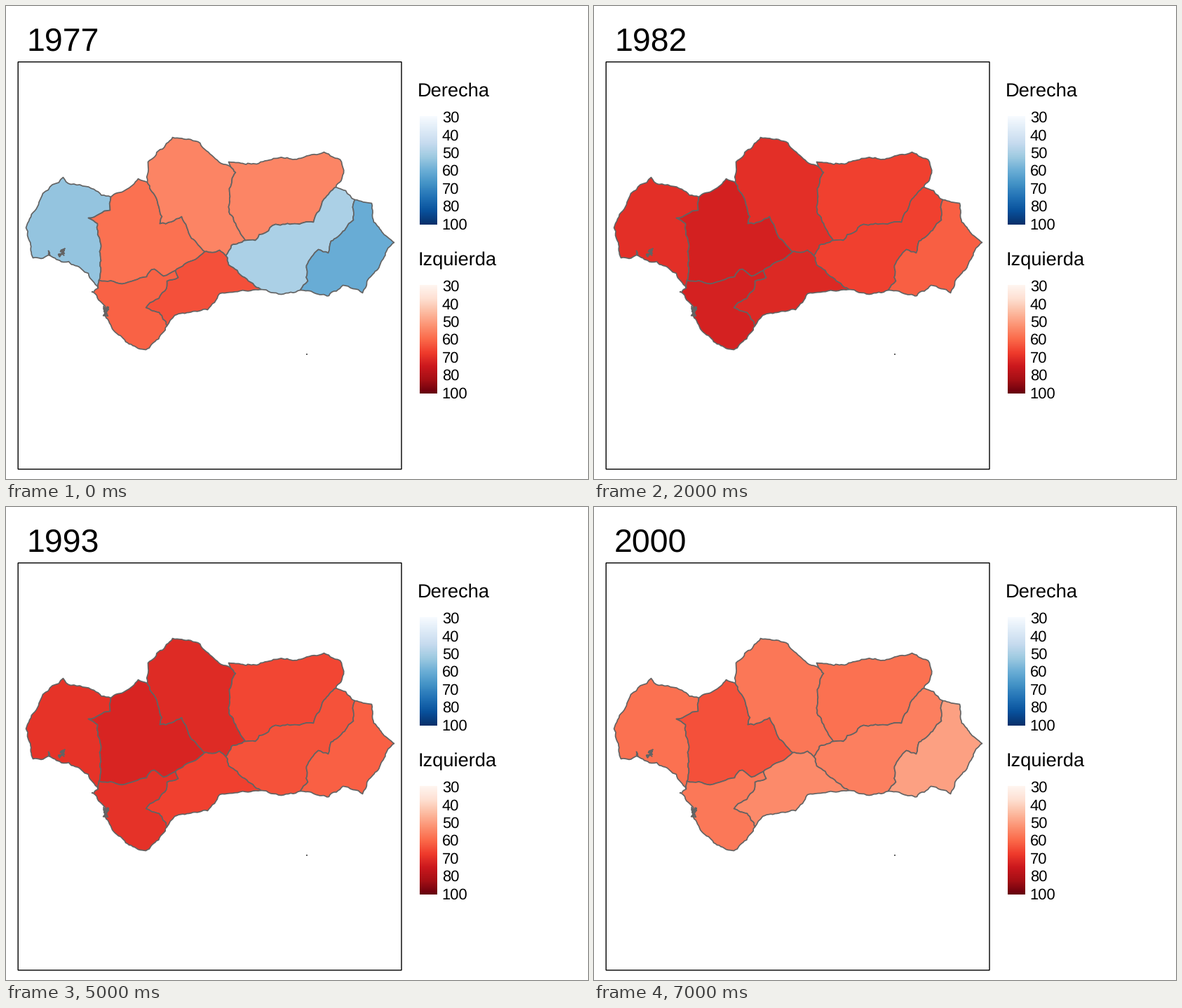
These frames come from a looping animation (830x675 px, 8 s). A matplotlib script:

```python
import numpy as np
import matplotlib.pyplot as plt
from matplotlib.animation import FuncAnimation
from matplotlib.colors import LinearSegmentedColormap
from matplotlib.patches import Polygon, Rectangle

W, H, DPI = 830, 675, 100
YEARS = (1977, 1979, 1982, 1986, 1989, 1993, 1996, 2000)
GREY = "#636363"
plt.rcParams["font.family"] = "Liberation Sans"
plt.rcParams["text.hinting"] = "none"
rng = np.random.default_rng(4)


def ramp(name, colors):
    return LinearSegmentedColormap.from_list(name, colors.split())


REDS = ramp("left", "#fff5f0 #fee0d2 #fcbba1 #fc9272 #fb6a4a #ef3b2c #cb181d #a50f15 #67000d")
BLUES = ramp("right", "#f7fbff #deebf7 #c6dbef #9ecae1 #6baed6 #4292c6 #2171b5 #08519c #08306b")

# Points where borders meet
NODES = dict(A=(149, 272), B=(201, 251), C=(320, 229), D=(470, 258), E=(497, 276),
             F=(419, 405), G=(363, 404), H=(229, 456), I=(132, 391), J=(241, 377),
             K=(283, 350), L=(341, 334), M=(313, 356), N=(131, 402), Z=(553, 337))

# Key points of the border from one node to another
BORDERS = {
    "NA": [(117, 381), (98, 370), (60, 355), (38, 359), (28, 316), (52, 267), (81, 244),
           (92, 254), (125, 261)],
    "AB": [(170, 262), (188, 246)],
    "BC": [(202, 222), (237, 187), (263, 190), (306, 224)],
    "CD": [(317, 222), (357, 225), (381, 217), (425, 215), (453, 208), (478, 222), (481, 238)],
    "DE": [(484, 263)],
    "EZ": [(521, 281), (524, 308)],
    "ZF": [(530, 375), (508, 409), (480, 398), (460, 413)],
    "FG": [(392, 411)],
    "GH": [(304, 410), (287, 433), (240, 441)],
    "HN": [(214, 476), (199, 490), (160, 469), (146, 449), (141, 428), (124, 408)],
    "AI": [(148, 291), (117, 302), (130, 310), (133, 350)],
    "IN": [],
    "BK": [(213, 272), (222, 300), (219, 310), (250, 300), (264, 331)],
    "KJ": [(276, 356), (262, 364)],
    "JI": [(224, 385), (211, 375), (200, 386), (165, 396)],
    "JH": [(245, 387), (229, 392), (226, 406), (199, 430), (218, 437)],
    "KM": [(304, 348)],
    "ML": [(321, 341)],
    "CL": [(327, 237), (318, 260), (318, 290), (328, 313)],
    "LD": [(355, 334), (384, 311), (438, 308), (453, 275)],
    "EF": [(495, 305), (463, 335), (459, 352), (445, 347), (428, 370), (430, 392)],
    "MG": [(317, 369), (340, 387)],
}

# Nodes around each region, and the left's share of the vote in the key years
KEY_YEARS = (1977, 1979, 1982, 1989, 1996, 2000)
REGIONS = {
    "Huelva": ("NAI", (46, 56, 70, 74.6, 65.4, 58.8)),
    "Sevilla": ("ABKJI", (58.8, 60, 73.2, 77.4, 68.6, 64.2)),
    "Córdoba": ("BCLMK", (55.2, 57, 70, 75.3, 67.5, 57.6)),
    "Jaén": ("CDL", (55, 56, 66.6, 70.2, 62.4, 58.8)),
    "Granada": ("DEFGML", (49.9, 54, 66.7, 67.4, 61.2, 56.1)),
    "Almería": ("EZF", (39.4, 39.4, 61.8, 65.6, 58.5, 50.1)),
    "Málaga": ("GHJKM", (64, 63, 71.4, 73.9, 61.4, 54)),
    "Cádiz": ("HNIJ", (61.2, 61.2, 73, 76.5, 64.2, 57.4)),
}


def roughen(a, b):
    """Midpoint displacement: a ragged line from a up to, but without, b."""
    length = np.hypot(*(b - a))
    if length < 5:
        return [a]
    normal = np.array([a[1] - b[1], b[0] - a[0]]) / length
    mid = (a + b) / 2 + normal * rng.normal(0, min(0.07 * length, 1.4))
    return roughen(a, mid) + roughen(mid, b)


def trace(name):
    keys = np.array([NODES[name[0]], *BORDERS[name], NODES[name[1]]], float) + 0.5
    line = [p for a, b in zip(keys, keys[1:]) for p in roughen(a, b)]
    return np.array(line + [keys[-1]])


def ring(nodes):
    parts = []
    for a, b in zip(nodes, nodes[1:] + nodes[0]):
        parts.append(lines[a + b] if a + b in lines else lines[b + a][::-1])
    return np.vstack(parts)


def fill(share):
    """The winning side's colour; the scale runs from 30 and passes 60 halfway."""
    cmap = REDS if share > 50 else BLUES
    return cmap((max(share, 100 - share) - 30) / 60)


def px(size):
    return size * 72 / DPI


def label(x, y, text, size):
    return ax.text(x, y, text, fontsize=px(size), color="black", va="baseline")


def legend(name, top, cmap):
    label(587, top - 28, name, 27.3)
    ax.imshow(np.linspace(0, 1, 256)[:, None], cmap=cmap, aspect="auto",
              extent=(590, 615, top + 155, top), interpolation="bilinear")
    for i, value in enumerate((30, 40, 50, 60, 70, 80, 100)):
        label(621.7, top + 9 + 25.4 * i, str(value), 22)


def scribble(x, y, width, height, n=14):
    """A tangle of small inlets."""
    xs, ys = rng.uniform(-0.5, 0.5, (2, n))
    ax.plot(x + width * xs, y + height * ys, color=GREY, lw=px(1.7))


fig = plt.figure(figsize=(W / DPI, H / DPI), dpi=DPI, facecolor="white")
ax = fig.add_axes([0, 0, 1, 1])
ax.axis("off")

lines = {name: trace(name) for name in BORDERS}
patches = [ax.add_patch(Polygon(ring(nodes), ec=GREY, lw=px(1.7), joinstyle="round"))
           for nodes, _ in REGIONS.values()]

scribble(79, 352, 11, 12)
scribble(61, 352, 4, 8, 5)
scribble(142, 435, 9, 16)
for x, y in ((122.5, 408), (428.5, 497)):
    ax.add_patch(Rectangle((x - 1, y - 1), 2, 2, fc=GREY, ec="none"))

ax.add_patch(Rectangle((17.2, 79.8), 546.8, 581.2, fill=False, ec="black",
                       lw=px(1.4), snap=False))
legend("Derecha", 157, BLUES)
legend("Izquierda", 398, REDS)
title = label(29, 64, "", 46.5)
ax.set_xlim(0, W)
ax.set_ylim(H, 0)


def update(frame):
    year = YEARS[frame]
    title.set_text(str(year))
    for patch, (_, shares) in zip(patches, REGIONS.values()):
        patch.set_facecolor(fill(np.interp(year, KEY_YEARS, shares)))
    return [title, *patches]


anim = FuncAnimation(fig, update, frames=len(YEARS), interval=1000,
                     repeat=True, repeat_delay=0, blit=False)
plt.show()
```
